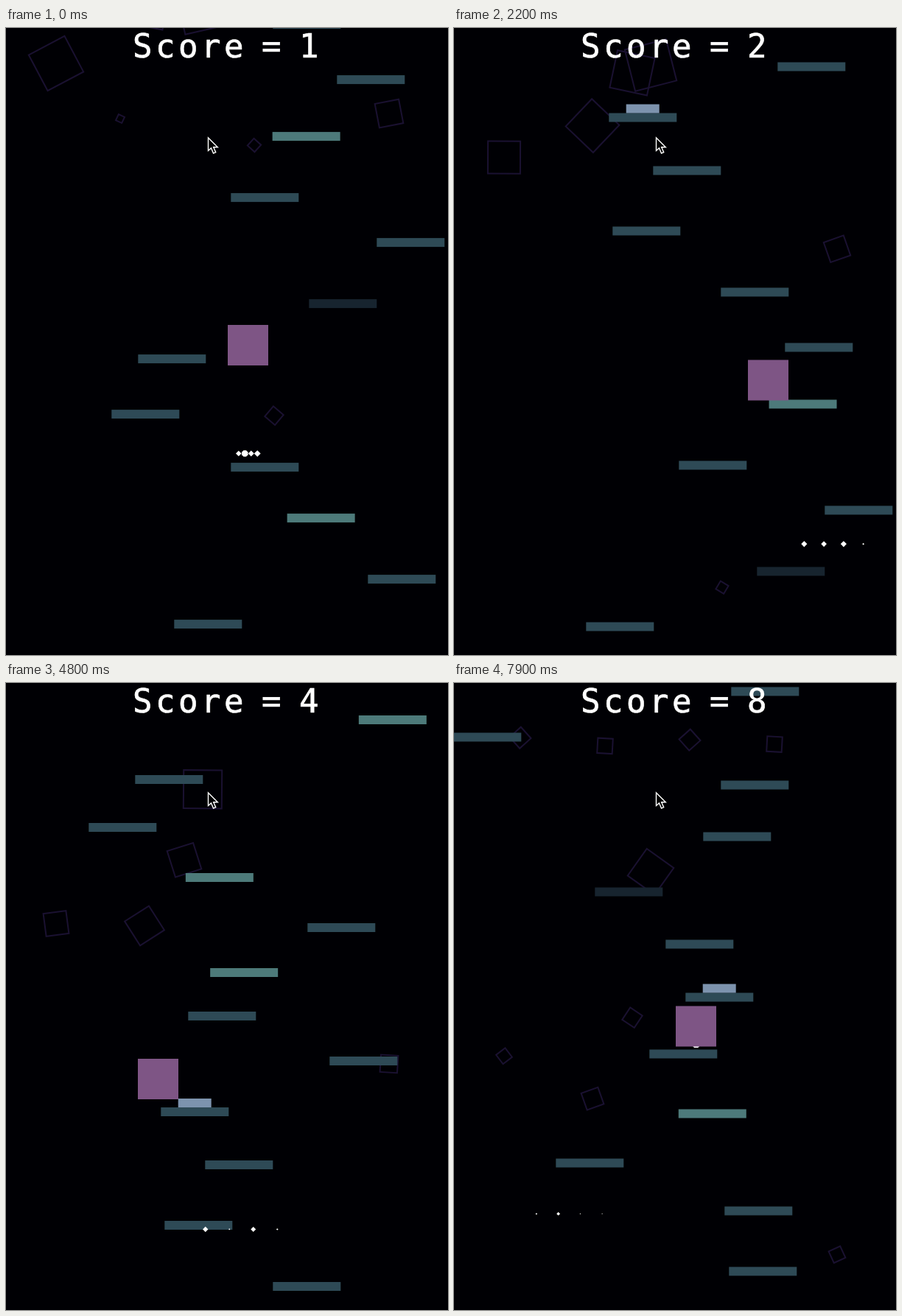
An HTML page with a canvas that plays this animation: 600 px wide and 851 px high, repeating every 8 s.

```html
<!DOCTYPE html>
<html lang="en">
<head>
<meta charset="utf-8">
<title>Jumping square</title>
<style>
  html, body { margin: 0; width: 100%; height: 100%; overflow: hidden; background: #000004; }
  canvas { display: block; }
  #score {
    position: absolute; left: 172px; top: 0; color: #fff; white-space: pre;
    font: 44px/50px "DejaVu Sans Mono", monospace;
    letter-spacing: 4.5px; word-spacing: -11px; -webkit-text-stroke: .7px #fff;
  }
  svg { position: absolute; left: 273px; top: 147px; }
</style>
</head>
<body>
<canvas id="stage" width="600" height="851"></canvas>
<div id="score">Score = 1</div>
<svg width="18" height="26"><path d="M1.5 2v17.5l4-3.5 3 7 3.2-1.4-3-6.8h5.6z" fill="#000" stroke="#fff" stroke-width="1.4"/></svg>
<script>
const ctx = document.getElementById('stage').getContext('2d');
const score = document.getElementById('score');
const LOOP = 8000, LINE = 403, SIZE = 55, JUMP = 190.5;
const RUN = .6, SLIDE = .366, SPAN = 526;

// Level from the bottom up: gap to the platform below, x (or phase when sliding), kind
let height = 803;
const level = [
  [0, 228], [61, 491], [83, 662, 'slide'], [69, 305], [72, 143], [75, 179],
  [75, 411, 'faint'], [83, 503], [61, 305], [83, 682, 'slide'], [77, 449], [75, 362],
  [83, 215], [82, 270], [72, 210, 'spring'], [69, 439], [61, 247], [59, 632, 'slide'],
  [61, 409], [68, 95, 'slide'], [68, 112], [65, 175], [81, 912, 'slide'],
  [83, 496, 'spring'], [64, 344, 'spring'], [74, 373], [82, 367], [65, 138],
  [67, 577, 'slide'], [81, 265], [77, 314, 'spring'], [72, 287], [71, 191, 'faint'],
  [75, 338], [70, 362], [65, -1], [62, 376]
].map(([gap, x, kind]) => ({ x, kind, y: height -= gap }));

// Where the player bounces: time, x, y
const hops = [
  [-256, 301, 535], [595, 191, 388], [1390, 488, 230], [2201, 399, 87], [3058, 399, -65.5],
  [3816, 292, -230.5], [4801, 179, -314], [6080, 448, -1056], [7000, 129, -1200],
  [7895, 301, -1351], [8720, 360, -1500]
];

// Background squares: x, y, fall speed, side, shrink speed, angle, turn speed
const squares = [
  [68, 48, .058, 55, .005, 62, .1355],
  [520, 116, .0835, 33, .002, 79, .078],
  [155, 123, .044, 9, .007, 25, .13],
  [337, 159, .047, 13, .006, 42, .13],
  [364, 526, .106, 18, .0025, 40, .1185],
  [188, -34, .0757, 62, .0048, 11, .1784],
  [242, -91, .069, 64, .0056, 16, .1617],
  [267, -29, .0361, 63, .0023, -13, .0403]
];
// A later row enters near the end
for (let k = 0; k < 4; k++) {
  squares.push([90 + 115 * k, -500 + 50 * random(k), .07, 60, .005, 45 * k, .12]);
}

function random(n) {
  const v = Math.sin(n * 12.9898 + 4) * 43758.5453;
  return v - Math.floor(v);
}

const clamp = (v, lo, hi) => Math.min(hi, Math.max(lo, v));

// Only a spring can reach further than one jump
const jumpHeight = (y0, y1) => y0 - y1 > JUMP ? 4 * JUMP : JUMP;

// Follows the hops up to t; gives the place of the player and the camera scroll
function climb(t) {
  let x, y, top = LINE;
  for (let i = 0; i < hops.length - 1 && hops[i][0] <= t; i++) {
    const [t0, x0, y0] = hops[i], [t1, x1, y1] = hops[i + 1];
    const h = jumpHeight(y0, y1);
    const rise = (t1 - t0) / (1 + Math.sqrt(1 - (y0 - y1) / h));
    const u = (t - t0) / rise;
    y = y0 - h * (1 - (1 - u) ** 2);
    top = Math.min(top, u > 1 ? y0 - h : y);
    // Runs sideways at one speed around the middle of the flight
    const run = RUN * (t - (t0 + t1) / 2) * Math.sign(x1 - x0);
    x = clamp((x0 + x1) / 2 + run, Math.min(x0, x1), Math.max(x0, x1));
  }
  return { x, y, scroll: LINE - top };
}

function slideX(phase, t) {
  const p = (phase + SLIDE * t) % (2 * SPAN);
  return clamp(Math.min(p, 2 * SPAN - p) - 8, 1, 508);
}

function rect(color, x, y, w, h) {
  ctx.fillStyle = color;
  ctx.fillRect(x, y, w, h);
}

function drawSquare([x, y, fall, side, shrink, angle, turn], t) {
  const s = side - shrink * t;
  if (s < 1) return;
  ctx.save();
  ctx.translate(x, y + fall * t);
  ctx.rotate((angle + turn * t) * Math.PI / 180);
  ctx.strokeRect(-s / 2, -s / 2, s, s);
  ctx.restore();
}

function drawPlatform({ x, y, kind }, t, scroll) {
  const color = { slide: '#4d7a7a', faint: '#17242f' }[kind] || '#2e4a56';
  rect(color, kind === 'slide' ? slideX(x, t) : x + .3, y + scroll, 92, 12);
  if (kind === 'spring') rect('#7d93ae', x + 23.7, y + scroll - 12, 45, 12);
}

function spark(x, y, r) {
  const n = r > 4.5 ? 8 : 4, turn = n === 8 ? Math.PI / 8 : 0;
  ctx.beginPath();
  for (let i = 0; i < n; i++) {
    const a = turn + i * 2 * Math.PI / n;
    ctx.lineTo(x + r * Math.cos(a), y + r * Math.sin(a));
  }
  ctx.fill();
}

// Four sparks fan out from each bounce, shrinking as they fall
function drawSparks(i, t, scroll) {
  const [t0, x, y] = hops[i], age = t - t0;
  if (age < 0 || jumpHeight(y, hops[i + 1][2]) > JUMP) return;
  const sy = y + SIZE + scroll - 8 - .06 * age + .000165 * age * age;
  for (let k = 0; k < 4; k++) {
    const speed = (k - 1.5) * .033, r = 3 + 3.7 * random(4 * i + k) - .003 * age;
    if (r > .5) spark(x + SIZE / 2 + speed * age, sy, r);
  }
}

function draw(t) {
  const { x, y, scroll } = climb(t);
  rect('#000004', 0, 0, 600, 851);
  ctx.strokeStyle = '#1a1131';
  ctx.lineWidth = 2;
  for (const s of squares) drawSquare(s, t);
  for (const p of level) drawPlatform(p, t, scroll);
  ctx.fillStyle = '#fff';
  for (let i = 0; i < hops.length - 1; i++) drawSparks(i, t, scroll);
  rect('#7e5585', x, y + scroll, SIZE, SIZE);

  const label = 'Score = ' + Math.floor((scroll + 330) / 250);
  if (score.textContent !== label) score.textContent = label;
}

const start = performance.now();
function tick() {
  draw((performance.now() - start) % LOOP);
  requestAnimationFrame(tick);
}
tick();
</script>
</body>
</html>
```
